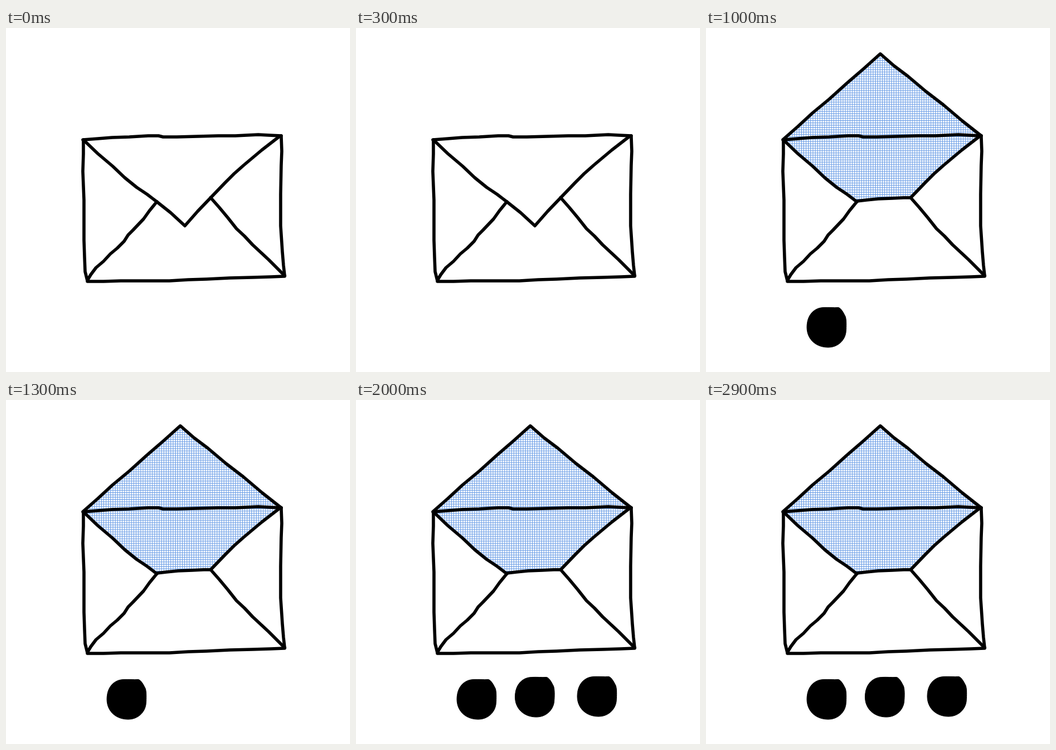
Animation of 600 by 600 pixels, one loop 3500 ms. Source, as an HTML page:

```html
<!DOCTYPE html>
<html lang="en">
<head>
<meta charset="utf-8">
<title>Envelope</title>
<style>
html, body { margin: 0; width: 100%; height: 100%; overflow: hidden; background: #fff; }
svg { display: block; width: 100%; height: 100%; }
.ink { fill: none; stroke: #000; stroke-width: 5.5; stroke-linecap: round; stroke-linejoin: round; }
</style>
</head>
<body>
<svg viewBox="0 0 600 600">
  <defs>
    <clipPath id="lining">
      <path d="M136 194L304 45L480 188L415 239L357 296L263 302L186 241Z"/>
    </clipPath>
    <path id="dot" stroke="#000" d="M205 487.5C214 487 222 488 231 487.5C236 489 240 497 243 503C245 508 245 520 244 531C242 545 230 557 213 557C192 557 176 543 176 522C176 501 188 488 205 487.5Z"/>
  </defs>

  <rect width="600" height="600" fill="#fff"/>

  <g id="open">
    <path id="grid" clip-path="url(#lining)" fill="none" stroke="#6a9de6"/>
    <path class="ink" d="M135 194L160 172L186 148L215 124L246 96L275 71L304 45L328 66L352 84L384 111L414 134L447 162L480 188"/>
    <path class="ink" d="M263 302L280 300L300 298L325 297L345 296L357 296"/>
  </g>
  <path id="tip" class="ink" d="M263 303L287 322L312 345L334 320L357 296"/>

  <g class="ink">
    <path d="M134 195L160 193L185 191L215 190L248 188L266 188L274 190L298 190L335 189L370 188L400 188L440 186L458 187L480 188"/>
    <path d="M480 188L481 215L480 240L479 290L479 345L482 390L484 414L486 432"/>
    <path d="M486 433L462 434L430 435L390 436L350 438L318 439L285 441L240 441L200 441L170 442L142 442"/>
    <path d="M142 441L138 425L137 400L136 370L136 335L136 300L135 275L134 250L135 220L135 195"/>
    <path d="M136 196L160 219L186 241L207 261L228 278L246 290L263 303"/>
    <path d="M357 296L382 270L398 254L415 239L446 213L477 189"/>
    <path d="M142 440L148 430L157 418L170 407L182 394L194 384L206 372L213 361L222 352L240 333L250 319L263 303"/>
    <path d="M357 296L372 313L387 331L402 350L416 363L430 378L458 404L486 432"/>
  </g>

  <g id="dots">
    <use href="#dot"/>
    <use href="#dot" x="101.5" y="-4"/>
    <use href="#dot" x="210" y="-5"/>
  </g>
</svg>
<script>
const LOOP = 3500, STEP = 500;
const byId = id => document.getElementById(id);
const dots = [...byId('dots').children];

// The pitch is slightly off a whole pixel, so the lines soften in slow waves.
const PITCH = 4.032;
let lines = '';
for (let x = 424.5 - 72 * PITCH; x < 485; x += PITCH) lines += `M${x} 40V310`;
for (let y = 40.5; y < 310; y += PITCH) lines += `M130 ${y}H490`;
byId('grid').setAttribute('d', lines);

const show = (el, on) => el.setAttribute('visibility', on ? 'visible' : 'hidden');

function draw(t) {
  const opened = t >= STEP;
  show(byId('open'), opened);
  show(byId('tip'), !opened);
  dots.forEach((dot, i) => show(dot, t >= (i + 2) * STEP));
}

const start = performance.now();
function tick() {
  draw((performance.now() - start) % LOOP);
  requestAnimationFrame(tick);
}
tick();
</script>
</body>
</html>
```
